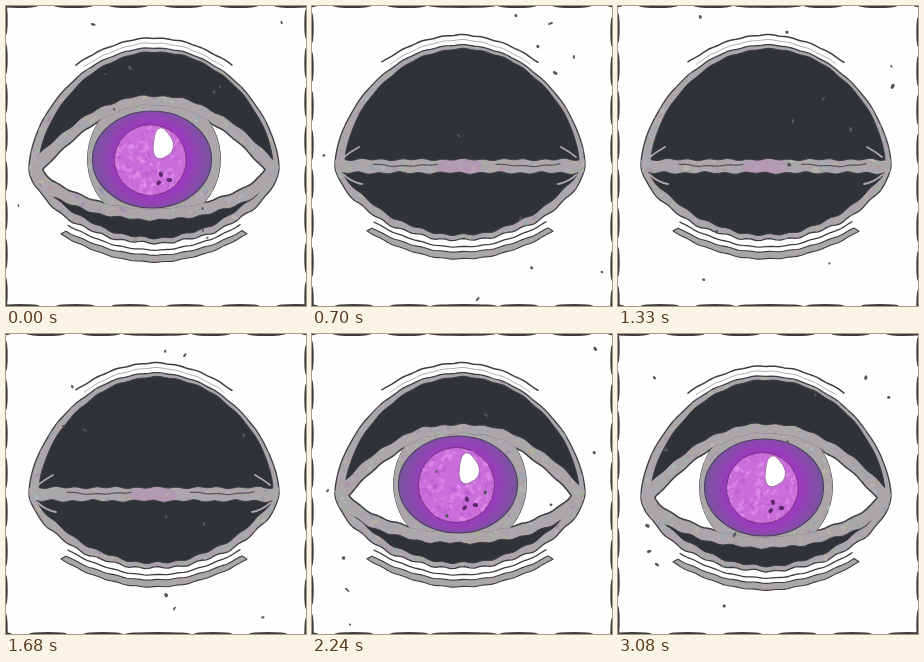
An HTML page with a canvas for the animation above (3150 ms loop, 300 by 300 pixels).

```html
<!DOCTYPE html>
<html lang="en">
<head>
<meta charset="utf-8">
<title>Blinking eye</title>
<style>
html, body { margin: 0; width: 100%; height: 100%; overflow: hidden; background: #fefefe; }
canvas { display: block; width: 300px; height: 300px; }
</style>
</head>
<body>
<canvas id="stage" width="300" height="300"></canvas>
<script>
const ctx = document.getElementById('stage').getContext('2d');
const STEP = 70, STEPS = 45;
const INK = '#3c3d42', DARK = '#2f3236', GREY = '#aaa6a9', PAPER = '#fefefe';

function ease(from, to, n) {
  const t = Math.min(1, Math.max(0, (n - from) / (to - from)));
  return t * t * (3 - 2 * t);
}

function random(seed) {
  let s = (seed * 7919 + 12345) >>> 0;
  return () => {
    s = (s + 0x6d2b79f5) >>> 0;
    let t = Math.imul(s ^ (s >>> 15), s | 1);
    t ^= t + Math.imul(t ^ (t >>> 7), t | 61);
    return ((t ^ (t >>> 14)) >>> 0) / 4294967296;
  };
}

// Hand-drawn arch of the given height (negative rises) over a base line.
function arch({ cx = 148, half, base, height, power = 1 }) {
  const pts = [];
  for (let i = 0; i <= 80; i++) {
    const u = -Math.cos(i / 80 * Math.PI);
    pts.push([cx + half * u, base + height * Math.max(0, 1 - u * u) ** power]);
  }
  return pts;
}

const ripple = (pts, amp, phase) => pts.map(([x, y]) =>
  [x, y + amp * (Math.sin(x * .31 + phase) + .6 * Math.sin(x * .13 + phase * 2))]);

// Lids flatten against the resting line as they meet.
const close = (pts, rest, span, open) => pts.map(([x, y]) => {
  const reach = Math.abs(y - rest);
  const move = .4 * reach * open + .6 * Math.min(reach, span * open);
  return [x, rest + Math.sign(y - rest) * move];
});

function pathOf(pts, closed = true) {
  const path = new Path2D();
  pts.forEach(([x, y]) => path.lineTo(x, y));
  if (closed) path.closePath();
  return path;
}

const between = (top, low) => pathOf([...top, ...low.slice().reverse()]);

function oval(x, y, rx, ry = rx, turn = 0) {
  const path = new Path2D();
  path.ellipse(x, y, rx, ry, turn, 0, Math.PI * 2);
  return path;
}

function paint(path, fill, stroke, width = 1) {
  if (fill) { ctx.fillStyle = fill; ctx.fill(path); }
  if (stroke) { ctx.strokeStyle = stroke; ctx.lineWidth = width; ctx.stroke(path); }
}

function within(path, draw) {
  ctx.save();
  ctx.clip(path);
  draw();
  ctx.restore();
}

const outerTop = arch({ half: 125, base: 158, height: -119, power: .6 });
const outerLow = arch({ half: 125, base: 160, height: 74, power: .63 });
const innerTop = arch({ cx: 150, half: 117, base: 155, height: -112, power: .6 });
const innerLow = arch({ half: 118, base: 166, height: 63, power: .85 });
const rimTop = arch({ half: 125, base: 157, height: -71 });
const rimLow = arch({ half: 124, base: 164, height: 47, power: .65 });
const slitTop = arch({ half: 112, base: 161, height: -65 });
const slitLow = arch({ half: 112, base: 160, height: 40, power: .7 });

function mottle(rnd, count, [x, y, w, h], color) {
  for (let i = 0; i < count; i++) {
    const spot = oval(x + rnd() * w, y + rnd() * h, 1 + rnd() * 3, .8 + rnd() * 1.6, rnd() * 3);
    paint(spot, color(rnd));
  }
}

const tint = rnd => `hsla(${rnd() * 360}, 30%, ${58 + rnd() * 20}%, .35)`;
const petal = rnd => rnd() < .6 ? 'rgba(232,158,240,.4)' : 'rgba(170,70,200,.28)';

function border(alt) {
  for (let i = -3; i <= 3; i++) {
    const x = 150 + (i + (alt ? 0 : .5)) * 55, half = alt && i === 0 ? 33 : 19;
    paint(oval(x, 0, half, 2), INK);
    paint(oval(x + 2, 300, half, 2), INK);
  }
  for (let y = alt ? 22 : 14; y < 300; y += 39) {
    paint(oval(0, y, 1.7, 15), INK);
    paint(oval(300, y + 4, 1.7, 15), INK);
  }
}

function creases(phase) {
  const fold = (half, base, height, power) =>
    ripple(arch({ half, base, height, power }), .35, phase);
  const line = (pts, width, color = INK) => paint(pathOf(pts, false), null, color, width);
  line(fold(78, 56, -27), 1.5);
  line(fold(70, 58, -24), .8, '#99999c');
  line(fold(86, 216, 25), 1.3);
  paint(between(fold(88, 222, 24), fold(93, 225, 28)), GREY, INK, 1.1);
}

function lashes() {
  for (const side of [-1, 1]) {
    const mark = (a, b, c, d, e, f) => {
      const path = new Path2D();
      path.moveTo(148 + side * a, b);
      path.quadraticCurveTo(148 + side * c, d, 148 + side * e, f);
      paint(path, null, GREY, 1.8);
    };
    mark(116, 151, 110, 146, 101, 141);
    mark(117, 168, 109, 176, 98, 178);
  }
}

function iris(open, slit, wide, rim, size, rnd) {
  within(slit, () => {
    paint(slit, PAPER, INK, 3);
    paint(oval(148, 150, 67), GREY, INK, 1);
    mottle(rnd, 220, [80, 94, 136, 110], (r) => {
      return tint(r);
    });
    // Repaint the whites outside the ring.
    const outside = new Path2D();
    outside.rect(0, 0, 300, 300);
    outside.arc(148, 150, 67, 0, Math.PI * 2);
    ctx.save();
    ctx.clip(outside, 'evenodd');
    paint(slit, PAPER, INK, 3);
    ctx.restore();
  });
  within(wide, () => {
    const glow = ctx.createRadialGradient(146, 151, 33, 146, 151, 61);
    glow.addColorStop(0, '#a433c4');
    glow.addColorStop(.4, '#8f45b2');
    glow.addColorStop(1, '#75579b');
    paint(oval(146, 150.5, 59.5, 48.5), glow, '#4f4260', 1.2);
  });
  const pupil = oval(144.5, 151, size, size - .5);
  within(rim, () => {
    ctx.globalAlpha = Math.min(1, .16 + open * 2.4);
    paint(pupil, '#cb6edc', '#6b3579', 1);
    within(pupil, () => mottle(rnd, 170, [107, 113, 76, 76], petal));
  });
  within(wide, () => {
    const glint = [];
    for (let a = 0; a < Math.PI * 2; a += .15) {
      const bump = 1 + .1 * Math.sin(3 * a + 1);
      glint.push([156.5 + 10 * bump * Math.cos(a), 135 + 15 * bump * Math.sin(a)]);
    }
    paint(pathOf(glint), '#fff', '#a06aa8', 1);
    for (let i = 0; i < 3; i++) {
      const a = .2 + i * Math.PI * 2 / 3;
      paint(oval(157 + 6.5 * Math.cos(a), 170 + 5 * Math.sin(a), 2.7, 2, a), '#5d2869');
    }
  });
}

function seam(rim, phase) {
  within(rim, () => {
    ctx.globalAlpha = .22;
    paint(oval(147, 161, 24, 8), '#cf70d5');
  });
  for (const cx of [93, 216]) {
    const line = ripple(arch({ cx, half: 32, base: 158, height: 2 }), .4, phase);
    paint(pathOf(line, false), null, '#55545a', 1.2);
  }
}

function eye(open, size, phase, rnd) {
  const outer = between(ripple(outerTop, .35, phase), ripple(outerLow, 1, phase));
  const inner = between(ripple(innerTop, .5, phase), ripple(innerLow, .9, phase));
  const rim = between(
    ripple(close(rimTop, 153.5, 66, open), .8, phase),
    ripple(close(rimLow, 167, 45, open), .9, phase + 1));
  const slit = grow => between(
    ripple(close(slitTop, 160, 64, open), .6, phase).map(([x, y]) => [x, y - grow]),
    ripple(close(slitLow, 160, 40, open), .6, phase + 1).map(([x, y]) => [x, y + grow]));

  paint(outer, GREY, INK, 1.3);
  within(outer, () => mottle(rnd, 600, [20, 36, 256, 202], tint));
  paint(inner, DARK, INK, 1);
  within(outer, () => {
    lashes();
    paint(rim, GREY);
    within(rim, () => mottle(rnd, 420, [22, 82, 252, 134], tint));
  });
  within(inner, () => paint(rim, null, INK, 1));
  if (open > .04) iris(open, slit(0), slit(3.5), rim, size, rnd);
  else seam(rim, phase);
}

function specks(rnd) {
  for (let i = 0; i < 11; i++) {
    const x = 8 + rnd() * 284, y = 6 + rnd() * 288;
    paint(oval(x, y, 1 + rnd() * 1.7, .8 + rnd(), rnd() * 3), '#55555a');
  }
}

function render(n) {
  const rnd = random(n + 1), alt = n % 7 > 2, phase = alt ? 1.9 : 0;
  const open = 1 - ease(2, 8, n) + ease(26, 33, n);
  const drop = 3 * (1 - ease(6, 9, n) + ease(32, 36, n));
  ctx.fillStyle = PAPER;
  ctx.fillRect(0, 0, 300, 300);
  ctx.lineCap = ctx.lineJoin = 'round';

  border(alt);
  ctx.save();
  ctx.translate(0, drop);
  creases(phase);
  eye(open, 38 - drop * .7, phase, rnd);
  ctx.restore();
  specks(rnd);
}

let shown = -1;
function tick() {
  const n = Math.floor(performance.now() / STEP) % STEPS;
  if (n !== shown) render(shown = n);
  requestAnimationFrame(tick);
}
tick();
</script>
</body>
</html>
```
